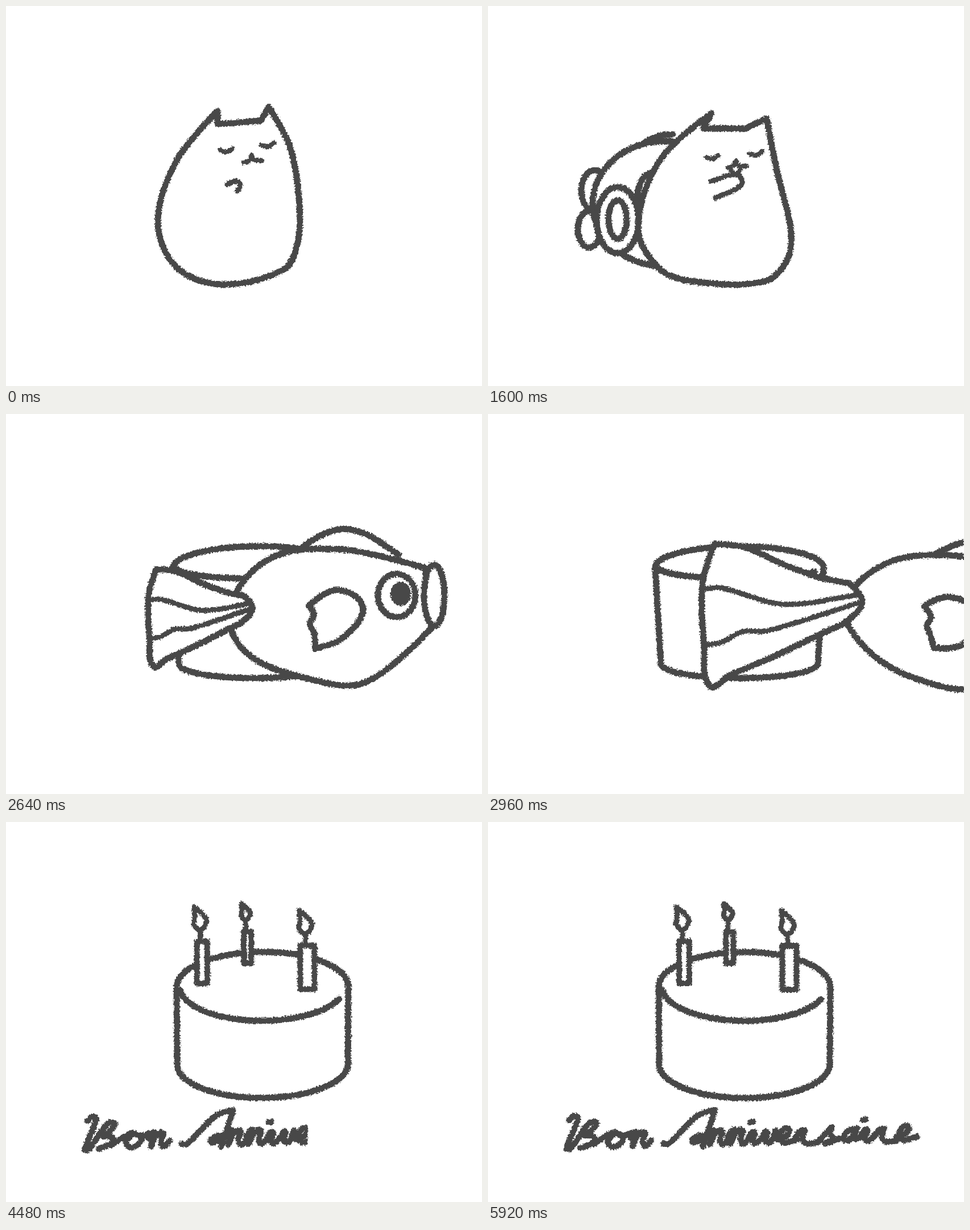
Animation of 837x669 px, one loop 6 s. Source, as an HTML page with a canvas:

```html
<!DOCTYPE html>
<html lang="fr">
<head>
<meta charset="utf-8">
<title>Bon Anniversaire</title>
<style>
  html, body { margin: 0; width: 100%; height: 100%; overflow: hidden; background: #fff; }
  canvas { display: block; filter: url(#rough); }
  svg { position: absolute; }
</style>
</head>
<body>
<svg width="0" height="0">
  <filter id="rough" x="0" y="0" width="100%" height="100%" color-interpolation-filters="sRGB">
    <feTurbulence id="grain" type="fractalNoise" baseFrequency="0.4" numOctaves="1"/>
    <feDisplacementMap in="SourceGraphic" scale="7" xChannelSelector="R" yChannelSelector="G"/>
  </filter>
</svg>
<canvas id="stage" width="837" height="669" role="img" aria-label="Bon Anniversaire"></canvas>
<script>
const ctx = document.getElementById('stage').getContext('2d');
const grain = document.getElementById('grain');
const INK = '#484848', PAPER = '#fff', STEP = 80, FRAMES = 75;

const lerp = (a, b, k) => a + (b - a) * k;
const progress = (frame, from, to) => Math.min(1, Math.max(0, (frame - from) / (to - from)));
const noise = n => { const s = Math.sin(n * 12.9898) * 43758.5453; return (s - Math.floor(s)) * 2 - 1; };

function track(frame, keys) {
  const next = keys.findIndex(key => frame < key[0]);
  if (next < 0) return keys[keys.length - 1][1];
  if (next === 0) return keys[0][1];
  const [f0, v0] = keys[next - 1], [f1, v1] = keys[next];
  return lerp(v0, v1, progress(frame, f0, f1));
}

// Points are "x,y"; a trailing "!" marks a sharp corner.
const points = text => text.split(' ').map(p => {
  const [x, y] = p.split(',').map(parseFloat);
  return { x, y, corner: p.endsWith('!') };
});
const blend = (a, b, k) => {
  const to = points(b);
  return points(a).map((p, i) => ({ ...p, x: lerp(p.x, to[i].x, k), y: lerp(p.y, to[i].y, k) }));
};
const place = (text, place) => points(text).map(p => ({ ...p, ...place(p) }));

// Smooth curve through a few key points.
function curve(pts, closed = false) {
  const path = new Path2D(), n = pts.length;
  const at = i => closed ? pts[(i + n) % n] : pts[Math.max(0, Math.min(n - 1, i))];
  const handle = (i, length) => {
    const p = at(i), a = at(i - 1), b = at(i + 1);
    const d = p.corner ? 0 : length / 3 / (Math.hypot(b.x - a.x, b.y - a.y) || 1);
    return [(b.x - a.x) * d, (b.y - a.y) * d];
  };
  path.moveTo(pts[0].x, pts[0].y);
  for (let i = 0; i < (closed ? n : n - 1); i++) {
    const p = at(i), q = at(i + 1), length = Math.hypot(q.x - p.x, q.y - p.y);
    const [ax, ay] = handle(i, length), [bx, by] = handle(i + 1, length);
    path.bezierCurveTo(p.x + ax, p.y + ay, q.x - bx, q.y - by, q.x, q.y);
  }
  if (closed) path.closePath();
  return path;
}

function oval(x, y, rx, ry, from = 0, to = 2 * Math.PI) {
  const path = new Path2D();
  path.ellipse(x, y, rx, ry, 0, from, to);
  return path;
}

function line(path, width = 11) {
  ctx.lineWidth = width;
  ctx.stroke(path);
}

function solid(path, width = 11, color = PAPER) {
  ctx.fillStyle = color;
  ctx.fill(path);
  line(path, width);
}

function cat(k) {
  solid(curve(blend(
    '372,208! 372,185! 300,272 267,380 300,460 380,490 488,464 512,420 516,350 500,250 462,178! 448,202!',
    '379,215! 393,189! 302,272 264,390 300,461 355,484 485,485 527,445 532,390 509,295 490,198! 452,216!', k), true));
  const feature = (shape, x, y) => line(curve(place(shape, p => ({ x: p.x + x, y: p.y + y }))), 8.5);
  feature('-11,0 0,3 10,-3', lerp(388, 395, k), lerp(254, 266, k));
  feature('-11,0 0,3 11,-4', lerp(460, 471, k), lerp(245, 260, k));
  feature('-14,12 -4,9 0,0! 5,8 18,9', lerp(432, 436, k), lerp(263, 273, k));
  if (k > 0.4) solid(oval(435, lerp(275, 287, k), 8 * k, 8 * k), 8);
  line(curve(blend('389,314 405,308 412,315 407,326', '392,309 438,297 445,315 400,338', k)), 9);
}

function fishFacingLeft(dx) {
  ctx.save();
  ctx.translate(dx, 0);
  solid(oval(188, 325, 24, 36));
  solid(oval(178, 393, 20, 32));
  line(oval(325, 290, 78, 64, Math.PI, 1.5 * Math.PI));
  solid(oval(310, 348, 126, 110));
  line(oval(290, 335, 27, 42));
  solid(oval(228, 377, 37, 58));
  line(oval(228, 376, 16, 34));
  ctx.restore();
}

function tail(k) {
  const left = lerp(180, -43, k), sx = lerp(0.3, 1, k), sy = lerp(0.37, 1, k), middle = lerp(362, 353, k);
  const fan = text => place(text, p => ({ x: left + (p.x + 43) * sx, y: middle + (p.y - 353) * sy }));
  solid(curve(fan('215,298! 165,288 100,265 30,234 -22,229! -43,300 -40,410 -30,479 5,460 80,428 170,385 212,364 238,330'), true));
  line(curve(fan('-40,308 -10,306 100,335 228,319')), 9);
  line(curve(fan('-39,407 -10,402 28,383 70,382 230,333')), 9);
}

function fish(frame) {
  const k = progress(frame, 29, 37);
  ctx.save();
  ctx.translate(360 + track(frame, [[23, -90], [26, -52], [28, 0], [33, 182], [37, 420], [43, 900]]),
                -330 * progress(frame, 37, 43) ** 2);
  ctx.scale(track(frame, [[23, 0.6], [25, 1]]), 1);
  ctx.translate(-360, 0);
  if (k < 0.2) tail(k);
  solid(curve(blend('280,248 330,204 370,187 410,196 472,236', '365,247 405,229 450,220 495,230 545,262', k)));
  solid(curve(blend('280,248 405,229 555,268! 567,372! 450,467 365,467 240,432 215,350',
                    '285,261 410,250 555,278! 567,382! 450,480 330,465 240,408 208,335', k), true));
  solid(oval(571, 321, 18, 54));
  solid(oval(505, 321, 33, 38));
  solid(oval(512, 318, 15, 18), 6, INK);
  solid(curve(blend('354,338! 412,299 451,335 400,388 358,415! 362,385 352,366 360,350',
                    '347,338! 390,322 440,350 417,404 364,412! 358,390 352,372 359,358', k), true));
  if (k >= 0.2) tail(k);
  ctx.restore();
}

// Centre, half widths, heights of the two arcs, and how far each arc bulges.
const SQUAT = { x: 442, rx: 148, foot: 138, top: 270, back: 37, front: 20, bottom: 440, belly: 25 };
const PLAIN = { x: 445, rx: 150, foot: 150, top: 294, back: 55, front: 50, bottom: 440, belly: 52 };
const PARTY = { x: 451, rx: 151, foot: 150, top: 290, back: 61, front: 60, bottom: 427, belly: 59 };
const CANDLES = [
  { x: 345, width: 18, top: 210, base: 284, flame: 40 },
  { x: 425, width: 13, top: 193, base: 249, flame: 28 },
  { x: 530, width: 25, top: 218, base: 295, flame: 41 }
];

function candle({ x, width, top, base, flame }, rise, lit) {
  const tip = lerp(base, top, rise), foot = top - lerp(20, 12, lit) - 5;
  const wick = new Path2D(), stick = new Path2D();
  wick.moveTo(x - 3, tip);
  wick.lineTo(x - 3, tip - 16 * rise);
  stick.rect(x - width / 2, tip, width, base - tip);
  line(wick, 9);
  solid(stick, 10);
  const size = flame * lit;
  if (lit) solid(curve(place('-0.3,-1! 0.15,-0.6 0.25,-0.35 0,0 -0.3,-0.2 -0.26,-0.55',
                             p => ({ x: x - 2 + p.x * size, y: foot - 4 + p.y * size })), true), 9);
}

function cake(frame) {
  const settled = frame >= 49;
  const [from, to] = settled ? [PLAIN, PARTY] : [SQUAT, PLAIN];
  const k = settled ? progress(frame, 49, 53) : progress(frame, 37, 44);
  const value = name => lerp(from[name], to[name], k);
  const x = value('x'), rx = value('rx'), top = value('top');
  const side = new Path2D();
  side.ellipse(x, top, rx, value('back'), 0, Math.PI, 2 * Math.PI);
  side.ellipse(x, value('bottom'), value('foot'), value('belly'), 0, 0, Math.PI);
  side.closePath();
  solid(side);
  line(oval(x, top, rx - 6, value('front'), 0.12 * Math.PI, 0.97 * Math.PI));

  if (frame > 45 && frame < 50) {
    line(oval(484, 281, 13, 7, 0.8 * Math.PI, 1.9 * Math.PI), 8);
    solid(oval(572, 266, 6, 3), 8, INK);
  }
  const rise = progress(frame, 42, 47), lit = progress(frame, 50, 53);
  if (rise) CANDLES.forEach(c => candle(c, rise, lit));
}

// Handwritten letters: advance width and pen path above the baseline.
const LETTERS = {
  B: [73, '11,-48 20,-56 26,-50 6,2 13,2 46,-43 59,-42 39,-21! 55,-18 52,-8 30,1'],
  o: [45, '-20,-4 17,-25 6,-10 12,0 25,-3 32,-16 17,-25! 35,-20 47,-24'],
  n: [36, '0,-14 11,-24 4,0! 12,-17 25,-24 22,-8 27,0 37,-10'],
  A: [80, '2,-3 12,-3 62,-52 93,-62! 72,2! 73,-16 54,-11 55,-5 84,-16'],
  i: [24, '0,-10 10,-20 7,-4 13,0 24,-10', '3,-37 8,-38'],
  v: [26, '0,-10 8,-20 6,-4 14,-1 24,-22! 27,-10'],
  e: [32, '0,-6 18,-13 21,-24 12,-24 5,-10 12,0 22,-2 36,-6'],
  r: [38, '0,-8 9,-20 17,-21! 13,-6 20,2 38,0'],
  s: [40, '2,0 26,-26! 24,-14 30,-3 14,2! 40,-6'],
  a: [38, '28,-22 14,-18 8,-4 18,-3 31,-23! 27,-5 38,-8'],
  ' ': [20]
};

function lettering(frame) {
  ctx.save();
  ctx.beginPath();
  ctx.rect(0, 490, 130 + STEP * (frame - 51), 179);
  ctx.clip();
  let left = 132;
  for (const letter of 'Bon Anniversaire') {
    const [advance, ...strokes] = LETTERS[letter];
    const x = left, baseline = 573 - 0.022 * (left - 132);
    for (const stroke of strokes)
      line(curve(place(stroke, p => ({ x: x + p.x, y: baseline + p.y }))), 10.5);
    left += advance;
  }
  ctx.restore();
}

// A slight shear per step keeps the drawing alive.
function wobble(frame) {
  const step = frame < 26 ? frame % 5 : frame < 50 ? (frame + 2) % 3 : (frame + 1) % 5;
  const a = step && 0.006 * noise(step), b = step && 0.008 * noise(step + 20);
  ctx.setTransform(1, a, b, 1, -330 * b, -418 * a);
  grain.setAttribute('seed', step + 1);
}

function render(now) {
  const frame = Math.floor(now / STEP) % FRAMES;
  ctx.resetTransform();
  ctx.clearRect(0, 0, 837, 669);
  ctx.strokeStyle = INK;
  ctx.lineCap = ctx.lineJoin = 'round';
  wobble(frame);
  if (frame >= 18 && frame < 23) fishFacingLeft(track(frame, [[18, 90], [20, 0], [22, -45]]));
  if (frame < 25) cat(0.5 - 0.5 * Math.cos(Math.min(frame, 20) * Math.PI / 4));
  if (frame >= 31) cake(frame);
  if (frame >= 23 && frame < 44) fish(frame);
  if (frame > 51) lettering(frame);
}

const start = performance.now();
(function loop() {
  render(performance.now() - start);
  requestAnimationFrame(loop);
})();
</script>
</body>
</html>
```
